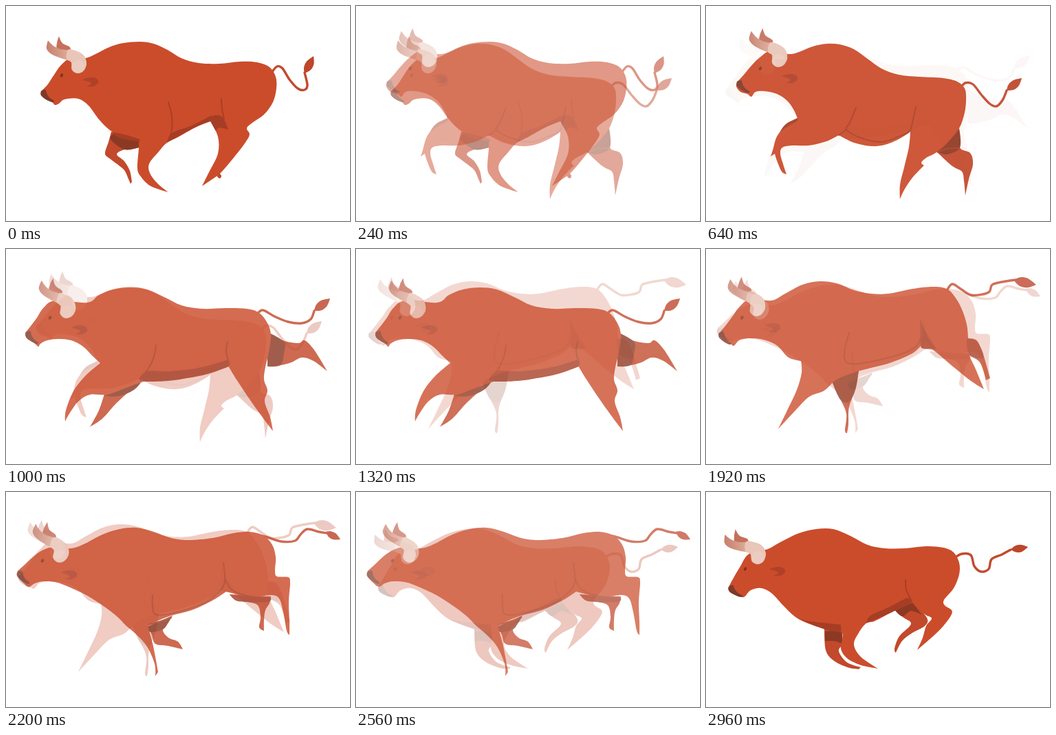
Animation of 500 by 313 pixels, one loop 3000 ms. Source, as an HTML page:

```html
<!DOCTYPE html>
<html>
<head>
<meta charset="utf-8">
<style>
html, body { margin: 0; width: 100%; height: 100%; overflow: hidden; background: #fff }
svg { display: block; width: 100vw; height: 100vh }
</style>
</head>
<body>
<svg id="stage" viewBox="0 0 500 313"></svg>
<script>
const RED = '#cb4c2b', SHADE = '#a63d25', DARK = '#8c3923', BROWN = '#7d3a2a';
const STEP = 600;

// Outlines are "x,y" points joined smoothly; "!" marks a sharp corner.
// horn/nose: [x, y, angle]; tail ends where the tuft [base, tip] begins.
const poses = [
  {
    body: '115,76 130,70 150,60 170,54 195,52 215,55 235,64 255,76 280,83 310,84 340,81 365,82 383,89 392,103 393,120 388,140 375,158 358,170 350,178 354,187 347,200 330,222 312,243 300,252 285,262! 295,242 308,215 308,190 297,167! 275,177 250,191 234,199 222,212 208,230 210,245 222,260 236,271! 210,262 195,247 191,235 193,207 193,193! 165,188 150,180 135,165 120,145 105,135 85,136 77,142 71,144 67,140 58,136 51,130 51,124! 60,115 70,100 80,86 95,75',
    far: ['153,183! 194,192! 194,206! 172,209 161,216 172,226 180,240 183,256! 181,259! 178,252 171,238 152,223 144,215 149,198', '309,243 313,247 311,251 307,248'],
    dark: ['156,186! 194,195! 193,206! 172,209 152,194'],
    shade: ['234,199! 241,185 270,174 299,159! 300,167! 272,178', '296,166! 303,159 315,162 323,180! 310,177 305,182!', '154,184! 172,187 194,194! 192,197 165,192'],
    lines: ['236,140 241,160 241,180 236,196', '313,135 314,150 317,164'],
    tail: '386,97 394,88 402,91 412,107 424,120 434,122 438,115 434,97', tuft: [434, 98, 447, 73],
    horn: [106, 85, 0], nose: [51, 124, 0], eye: [81, 101], ear: [123, 111]
  },
  {
    body: '120,70 135,67 155,59 175,55 195,56 215,63 235,77 255,91 280,100 310,103 345,105 365,110 376,120 378,135 376,155 368,178 350,200 335,213 320,221 313,228 317,232! 300,250 288,268 282,281! 282,260 288,235 295,205 297,183! 280,194 260,202 240,204 215,199 193,188! 175,197 150,203 125,203 111,206 108,215 112,230 117,245! 110,241 103,225 100,215! 94,219! 97,210 103,190 115,176 133,164! 128,152 118,138 103,128 85,124 72,125 66,132 60,128 50,125 44,117 46,110! 55,100 65,88 78,75 95,65',
    far: ['335,212! 368,178! 369,206 384,214 388,230 382,252 377,276! 375,255 372,241 358,233'],
    dark: ['335,212! 368,178! 369,206 350,216'],
    shade: ['107,184! 116,172 133,163! 132,168 118,176'],
    lines: ['218,148 209,170 204,180 225,192 255,198 280,190 296,182 301,165 305,147', '337,213 350,208 368,207', '193,188 204,180'],
    tail: '371,118 377,112 388,114 400,129 412,142 422,146 431,137 437,123', tuft: [437, 123, 459, 105],
    horn: [107, 76, 6], nose: [45, 110, 2], eye: [79, 91], ear: [122, 106]
  },
  {
    body: '118,78 135,67 155,59 180,56 205,59 230,70 255,82 285,87 320,86 350,87 368,93 380,108 385,125 382,150 377,172 375,190 380,206 376,222 384,245 388,265! 375,248 355,220 335,190 323,170! 300,180 270,187 235,190 203,192! 185,198 165,205 145,212 122,212 105,222 92,240 86,251! 87,235 98,207 115,185 137,166! 125,155 112,142 95,133 75,131 60,133 50,138 47,142 40,136 30,130 28,122! 36,112 45,100 55,85 72,75',
    far: ['143,211! 197,192! 175,211 158,227 140,247 122,259! 135,235', '380,121! 402,133 425,137 434,133 448,147 467,178! 447,163 430,158 415,165 400,169 380,171!'],
    dark: ['142,214! 160,208 197,193! 186,205 165,214', '380,121! 404,135 404,152 399,169 380,171!'],
    shade: ['193,190! 205,178 240,178 285,172 323,161! 324,171! 295,181 245,191 203,193'],
    lines: ['218,140 215,157 207,174 195,188', '322,135 320,150 325,168'],
    tail: '364,96 373,89 390,98 410,106 430,108 443,102 448,90', tuft: [448, 90, 471, 72],
    horn: [90, 88, 10], nose: [29, 121, 4], eye: [64, 100], ear: [107, 118]
  },
  {
    body: '95,75 115,65 140,52 165,47 190,50 215,60 240,65 265,65 300,58 330,55 350,58 362,70 372,88 379,110 381,130 382,152 392,175 404,204! 385,192 360,172 330,147 313,140! 300,152 270,165 240,173 215,180 190,190 172,206 150,215 130,235 105,262! 118,235 132,205 139,180 138,163! 120,158 105,142 90,134 70,130 50,132 40,141 34,135 24,130 18,124! 28,112 40,96 48,85 65,72',
    far: ['182,190! 222,176! 218,202 208,230 207,255 205,268! 202,264 204,240 195,218', '376,130! 392,132 400,145 405,160 413,188! 407,191! 398,165 380,152'],
    dark: ['182,190! 222,176! 217,204 208,222 195,219'],
    shade: ['313,106! 320,122 335,145! 316,145 312,138', '379,131! 392,133 400,146 403,158 392,158 381,150'],
    lines: ['208,122 203,140 201,158 209,167 235,165 280,154 304,143 312,128 312,105'],
    tail: '350,60 358,51 370,58 385,67 402,66 412,62 416,52 430,48 449,45', tuft: [447, 45, 480, 52],
    horn: [75, 85, 8], nose: [19, 122, 4], eye: [52, 100], ear: [97, 115]
  },
  {
    body: '95,82 115,75 140,62 165,54 190,52 215,58 240,67 265,70 300,67 330,60 355,58 375,64 387,77 392,95 391,115 394,123 410,124 413,132 411,160 412,190 412,208! 408,202 403,175 397,155 385,150 360,153 340,150 320,145! 300,158 270,172 240,180 215,190 206,196! 213,220 218,245 221,262! 217,268! 216,250 205,225 190,208 175,195 160,180 140,165 120,152 100,142 75,132 55,130 42,133 33,138 25,132 16,122 17,115! 28,105 42,92 55,84 70,80',
    far: ['206,196! 242,180! 236,190 228,201 236,212 250,218 257,229! 235,224 217,221 212,208', '325,149! 385,152! 383,162 377,172 375,186 375,202! 368,197 370,182 366,165 350,160 334,157'],
    dark: ['206,196! 242,180! 236,190 228,200 210,204'],
    shade: ['325,149! 345,151 385,154! 381,160 350,160 334,158'],
    lines: ['213,150 213,165 217,178 240,177 285,163 309,146 318,130 316,103', '318,126 328,142 350,151 384,155', '208,193 225,188 240,183'],
    tail: '365,62 380,66 400,72 420,71 428,62 438,54 455,58 467,60', tuft: [465, 58, 486, 69],
    horn: [80, 90, 12], nose: [17, 116, 6], eye: [53, 100], ear: [92, 121]
  },
  {
    body: '90,83 110,72 135,60 160,54 185,54 210,64 235,77 260,82 290,82 320,79 345,81 360,88 368,103 368,120 360,140 346,157 347,165 357,172 356,180 345,195 330,210 307,230! 315,212 320,195 328,184 318,178 300,161! 270,175 245,188 233,191 222,205 215,222 225,240 250,257! 225,252 205,242 196,228 199,210 196,201! 170,198 150,192 130,182 112,165 95,147 80,140 65,143 55,153 45,150 35,146 32,140! 40,125 50,108 60,92 75,85',
    far: ['172,199! 198,203! 198,221 193,232 205,248 225,255! 222,258! 205,255 185,245 174,230', '272,168! 300,158! 321,183 318,195 300,205 285,217 276,234! 274,228 281,210 298,192 286,182'],
    dark: ['173,203! 196,204 198,221! 187,217 173,217!', '272,169! 298,158! 314,179! 298,173 285,181'],
    shade: ['233,191! 239,180 265,168 292,154! 299,160 270,175', '131,183! 150,188 196,193! 197,205! 170,199'],
    lines: ['290,128 291,142 298,157'],
    tail: '361,96 372,90 385,92 390,108 400,116 411,112 415,98 430,91 443,84', tuft: [443, 84, 468, 80],
    horn: [76, 92, -6], nose: [33, 138, -4], eye: [57, 112], ear: [104, 116]
  }
];

// Catmull-Rom spline whose tangents vanish at corners
function spline(text, closed = true) {
  const pts = text.split(' ').map(s => {
    const [x, y] = s.replace('!', '').split(',').map(Number);
    return { x, y, sharp: s.endsWith('!') };
  });
  const n = pts.length;
  const at = i => closed ? pts[(i + n) % n] : pts[Math.max(0, Math.min(n - 1, i))];
  const handle = (i, sign) => {
    const p = at(i), k = p.sharp ? 0 : sign / 6;
    return [p.x + (at(i + 1).x - at(i - 1).x) * k, p.y + (at(i + 1).y - at(i - 1).y) * k];
  };
  let d = `M${pts[0].x},${pts[0].y}`;
  for (let i = 0; i < (closed ? n : n - 1); i++) {
    const q = at(i + 1);
    d += `C${handle(i, 1)} ${handle(i + 1, -1)} ${q.x},${q.y}`;
  }
  return d + (closed ? 'Z' : '');
}

const fill = (text, color) => `<path d="${spline(text)}" fill="${color}"/>`;
const line = (text, color, width) =>
  `<path d="${spline(text, false)}" fill="none" stroke="${color}" stroke-width="${width}" stroke-linecap="round"/>`;
const place = ([x, y, angle = 0], content) =>
  `<g transform="translate(${x} ${y}) rotate(${angle})">${content}</g>`;

function tuft([x, y, tx, ty]) {
  const dx = tx - x, dy = ty - y;
  const side = (along, out) => `${x + dx * along - dy * out},${y + dy * along + dx * out}`;
  return fill(`${x},${y}! ${side(.3, .2)} ${side(.65, .2)} ${tx},${ty}! ${side(.6, -.19)} ${side(.25, -.17)}`, '#bd462b');
}

const horns =
  fill('-29,-41! -24,-31 -13,-25 -15,-18 -31,-22 -32,-31', '#c5705c') +
  fill('-45,-35! -37,-27 -26,-22 -8,-20 6,-14 11,-2 7,9 -2,13 -10,8 -12,-4 -26,-9 -40,-15 -47,-23', 'url(#horn)') +
  fill('-16,-21 -5,-20 6,-14 11,-2 7,9 -2,13 -10,8 -11,-3 -18,-8', '#e9c6b8') +
  '<circle cx="-1" cy="3" r="9" fill="#eed0c4" opacity=".6"/>';
const muzzle = fill('0,0! 6,-2 9,5 13,10 19,14 16,16 7,12 0,6', BROWN);
const ear = fill('-11,-4 0,-7 9,-5 11,1 4,6 -6,6! 1,2 -3,-1', '#b04128');
const eye = '<ellipse rx="2" ry="2.8" transform="rotate(25)" fill="#84331f"/>';

const draw = p => '<g>' +
  line(p.tail, '#c24a2d', 3.4) + tuft(p.tuft) +
  p.far.map(s => fill(s, '#c2492b')).join('') +
  p.dark.map(s => fill(s, DARK)).join('') +
  fill(p.body, RED) +
  p.shade.map(s => fill(s, SHADE)).join('') +
  p.lines.map(s => line(s, '#ab3f25', 2)).join('') +
  place(p.nose, muzzle) + place(p.eye, eye) + place(p.ear, ear) + place(p.horn, horns) +
  '</g>';

const stage = document.getElementById('stage');
stage.innerHTML = '<defs><linearGradient id="horn"><stop stop-color="#c77f6c"/>' +
  '<stop offset=".7" stop-color="#e3b8a7"/></linearGradient></defs>' + poses.map(draw).join('');
const layers = [...stage.querySelectorAll(':scope > g')];
const clamp = v => Math.max(0, Math.min(1, v));

function frame(now) {
  const t = Math.floor(now % 3000 / 40) * 40;
  const from = Math.floor(t / STEP), u = t % STEP / STEP;
  layers.forEach((g, i) => {
    const alpha = i === from ? 1 - 1.08 * u : i === from + 1 ? 1.3 * u - .05 : 0;
    g.setAttribute('opacity', clamp(alpha));
  });
  requestAnimationFrame(frame);
}
frame(performance.now());
</script>
</body>
</html>
```
